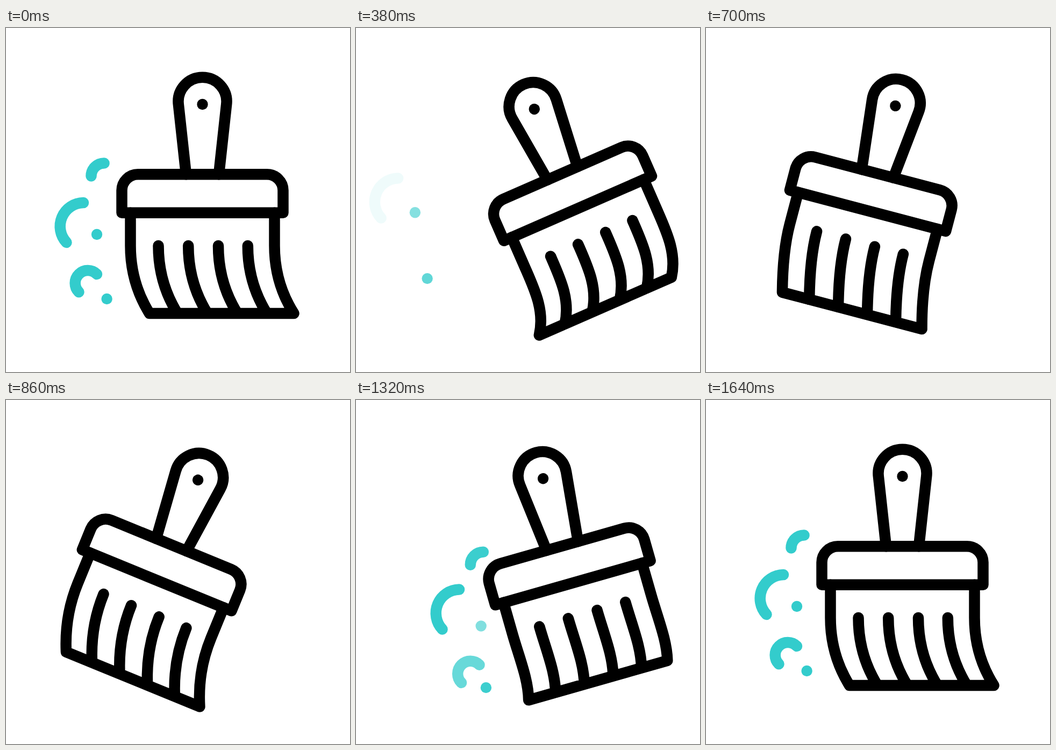
An HTML page for the animation above (1.8 s loop, 640x640 px).

```html
<!DOCTYPE html>
<html lang="en">
<head>
<meta charset="utf-8">
<title>Sweeping brush</title>
<style>
  html, body { margin: 0; width: 100%; height: 100%; overflow: hidden; background: #fff; }
  svg { display: block; width: 100%; height: 100%; }
  path { fill: none; stroke-width: 20.5; stroke-linecap: round; stroke-linejoin: round; }
  #brush path { stroke: #000; }
  #dust path { stroke: #33cccc; }
  #dust circle { fill: #33cccc; }
</style>
</head>
<body>
<svg viewBox="0 0 640 640">
  <g id="dust">
    <path d="M158.5 275.5A24 24 0 0 1 182.5 251.5"/>
    <path d="M112.5 399A44 44 0 0 1 144 325"/>
    <path d="M135.5 491.3A23.5 23.5 0 0 1 169 458"/>
    <circle cx="169" cy="384" r="10.2"/>
    <circle cx="187.6" cy="504" r="10.2"/>
  </g>
  <g id="brush">
    <path d="M335 272.3L320.8 142A45 45 0 1 1 410.2 142L396 272.3"/>
    <circle cx="365.5" cy="142" r="10.2"/>
    <path d="M215.5 343.7V302A30 30 0 0 1 245.5 272.3H485.5A30 30 0 0 1 515.5 302V343.7Z"/>
    <path id="bristles"/>
  </g>
</svg>
<script>
const LOOP = 1800, ACTIVE = 1640, STEP = 20;
const PIVOT = { x: 367, y: 241 };

// Brush poses: rotation in degrees, sideways shift, bend of the bristle tips.
const POSES = [
  { at: 0, angle: 0, shift: 0, bend: 0 },
  { at: 467, angle: -26, shift: 6.4, bend: -68 },
  { at: 800, angle: 26, shift: -50.8, bend: -2.5 },
  { at: 1167, angle: -26, shift: 15.8, bend: -66 },
  { at: 1527, angle: 0, shift: 0, bend: 0 }
];

// Dust leaves from time 0 and settles at ACTIVE; each piece has its own pace.
const DUST = [
  { leave: 340, settle: 470 },
  { leave: 390, settle: 519 },
  { leave: 365, settle: 425 },
  { leave: 475, settle: 403 },
  { leave: 513, settle: 470 }
];
const EXIT = { x: -66, y: -45.5 }, ENTRY = { x: 71.5, y: 41 };

const brush = document.getElementById("brush");
const bristles = document.getElementById("bristles");
const dust = [...document.getElementById("dust").children];

const clamp = v => Math.min(1, Math.max(0, v));
const ease = u => u * u * (3 - 2 * u);
const mix = (a, b, k) => a + (b - a) * k;

function poseAt(t) {
  let i = 0;
  while (i < POSES.length - 2 && t >= POSES[i + 1].at) i++;
  const a = POSES[i], b = POSES[i + 1];
  const k = ease(clamp((t - a.at) / (b.at - a.at)));
  return {
    angle: mix(a.angle, b.angle, k),
    shift: mix(a.shift, b.shift, k),
    bend: mix(a.bend, b.bend, k)
  };
}

const strand = (x, top, lean, bend) =>
  `M${x} ${top}V405C${x} 450 ${x + 12.5 + bend * 0.18} 494 ${x + lean + bend} 531`;

function drawBrush(t) {
  const { angle, shift, bend } = poseAt(t);
  brush.setAttribute("transform", `translate(${shift} 0) rotate(${angle} ${PIVOT.x} ${PIVOT.y})`);
  const inner = [283.5, 339.2, 395, 449.8].map(x => strand(x, 405, 35.5, bend));
  bristles.setAttribute("d",
    strand(231.5, 343.7, 35.5, bend) + `H${535.5 + bend}` +
    strand(499.5, 343.7, 36, bend) + inner.join(""));
}

function drawDust(t) {
  DUST.forEach(({ leave, settle }, i) => {
    const leaving = t < 700;
    const far = leaving ? clamp(t / leave) : clamp((ACTIVE - t) / settle);
    const path = leaving ? EXIT : ENTRY;
    const k = ease(far);
    dust[i].setAttribute("transform", `translate(${path.x * k} ${path.y * k})`);
    dust[i].setAttribute("opacity", clamp((1 - far) * 3));
  });
}

const start = performance.now();
function frame() {
  const elapsed = (performance.now() - start) % LOOP;
  const t = Math.min(ACTIVE, Math.floor(elapsed / STEP) * STEP);
  drawBrush(t);
  drawDust(t);
  requestAnimationFrame(frame);
}
frame();
</script>
</body>
</html>
```
